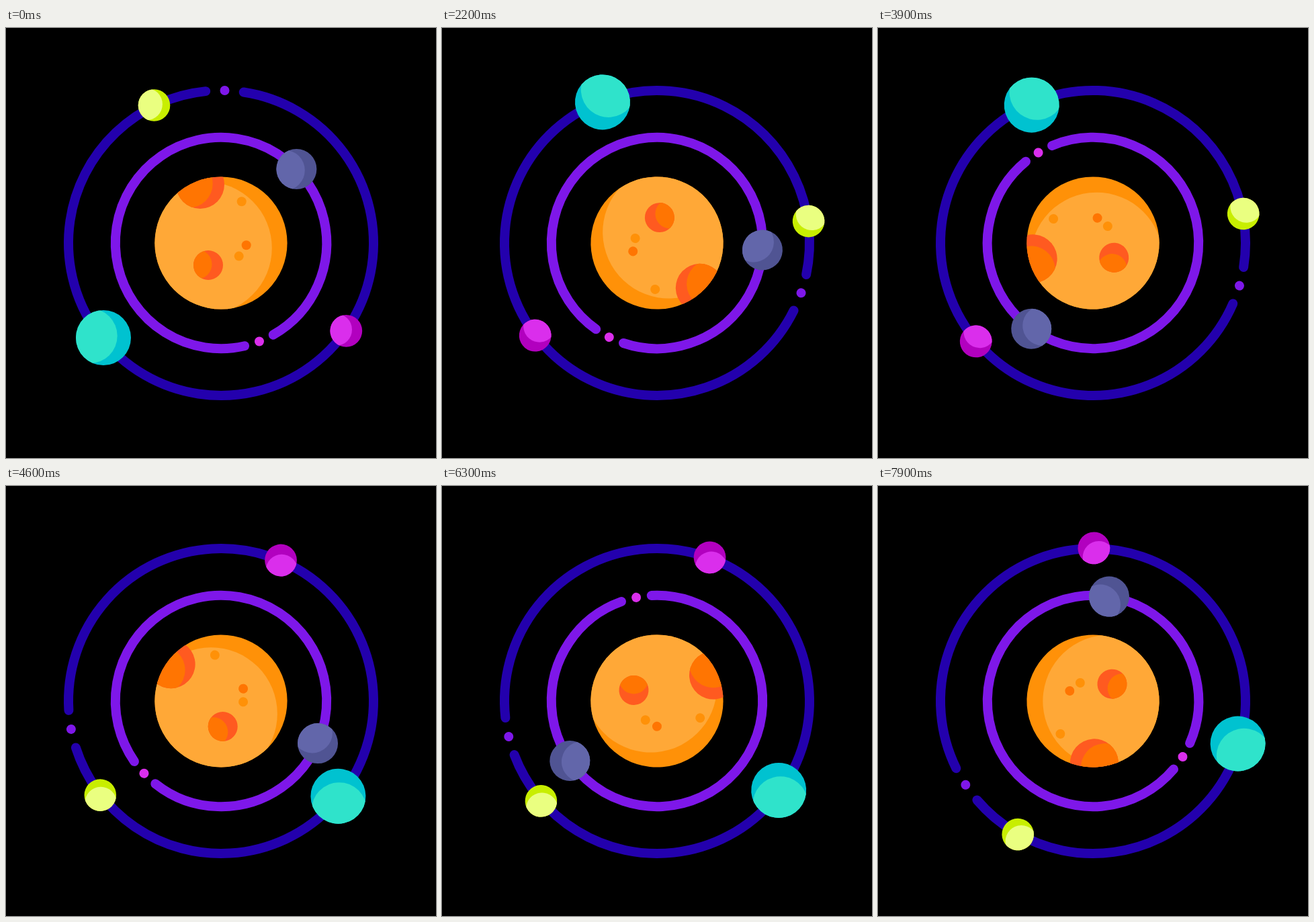
Recreate the animation shown at these times as an HTML page with a canvas. Size 640x640 px, loop 8000 ms.

```html
<!DOCTYPE html>
<html lang="en">
<head>
<meta charset="utf-8">
<title>Orbits</title>
<style>
  html, body { margin: 0; height: 100%; overflow: hidden; background: #000; }
  canvas { display: block; }
</style>
</head>
<body>
<canvas width="640" height="640"></canvas>
<script>
const ctx = document.querySelector('canvas').getContext('2d');
const LOOP = 8000, STEP = 100, TICK = 40;
const TURN = 2 * Math.PI, RAD = Math.PI / 180;
const TICKS_PER_TURN = 127;

const INDIGO = '#2300ad', PURPLE = '#7e17e9', MAGENTA = '#da2eec';
const SUN = '#ffa837', AMBER = '#ff9108', ORANGE = '#ff7502', RED = '#ff5a20';

function disc(x, y, r, color) {
  ctx.beginPath();
  ctx.arc(x, y, r, 0, TURN);
  ctx.fillStyle = color;
  ctx.fill();
}

// A shaded disc: the lit part is the same disc shifted by (dx, dy).
function ball(x, y, r, shade, light, dx, dy) {
  disc(x, y, r, shade);
  ctx.save();
  ctx.clip();
  disc(x + dx, y + dy, r, light);
  ctx.restore();
}

// A ring with a round-ended gap and a dot in its middle; angles run clockwise from the top.
function ring(r, at, gap, color, dotColor) {
  const mid = (at - 90) * RAD, half = gap * RAD;
  ctx.beginPath();
  ctx.arc(0, 0, r, mid + half, mid - half + TURN);
  ctx.strokeStyle = color;
  ctx.stroke();
  disc(r * Math.cos(mid), r * Math.sin(mid), 7, dotColor);
}

function spin(turns, paint) {
  ctx.save();
  ctx.rotate(turns * TURN);
  paint();
  ctx.restore();
}

function outerOrbit() {
  ring(227, 1.39, 7.15, INDIGO, PURPLE);
  ball(-99.5, -205, 23.8, '#c8ee00', '#eaff80', -11.4, -1.6);
  ball(186.3, 130.8, 23.9, '#b200bf', MAGENTA, -15.2, -1.8);
  ball(-175, 141, 41, '#00c2d0', '#2fe3cb', -20.3, -2.8);
}

function innerOrbit() {
  ring(157.2, 158.74, 8.35, PURPLE, MAGENTA);
  ball(112.4, -110, 30, '#505493', '#6266aa', -17.6, 1.7);
}

function sun() {
  ball(0, 0, 98.6, AMBER, SUN, -22.8, 7.4);
  ctx.save();
  ctx.beginPath();
  ctx.arc(0, 0, 98.6, 0, TURN);
  ctx.clip();
  ball(-31, -87, 36, RED, ORANGE, -17.3, -1.3);
  ctx.restore();
  ball(-19, 33, 22, RED, ORANGE, -16.5, -1.3);
  disc(30.7, -61.8, 7, AMBER);
  disc(26.7, 19.6, 7, AMBER);
  disc(37.7, 3.3, 7, ORANGE);
}

function draw() {
  const t = performance.now() % LOOP;
  const tick = Math.floor(Math.floor(t / STEP) * STEP / TICK);
  const turn = tick / TICKS_PER_TURN;
  ctx.setTransform(1, 0, 0, 1, 0, 0);
  ctx.fillStyle = '#000';
  ctx.fillRect(0, 0, 640, 640);
  ctx.translate(320, 320);
  ctx.lineWidth = 14;
  ctx.lineCap = 'round';
  spin(3 * turn, outerOrbit);
  spin(-2 * turn, innerOrbit);
  spin(turn, sun);
  requestAnimationFrame(draw);
}
draw();
</script>
</body>
</html>
```
